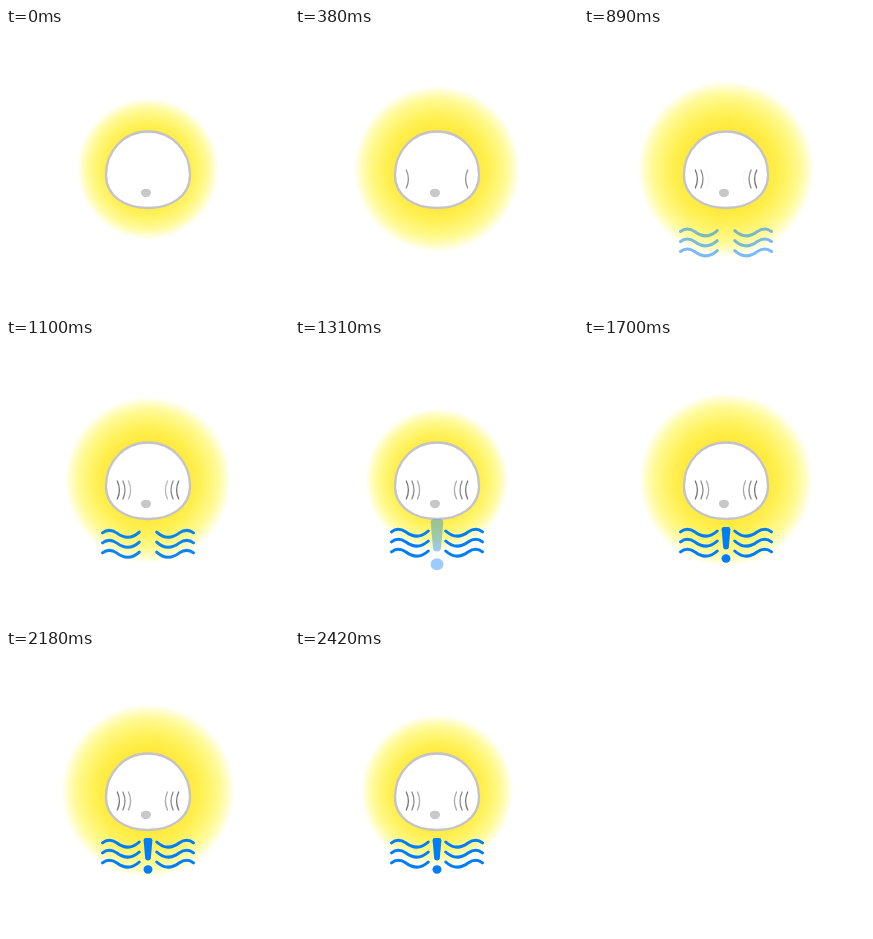
These frames come from a looping animation (283 by 283 pixels, 2.65 s). An HTML page:

```html
<!DOCTYPE html>
<html lang="en">
<head>
<meta charset="utf-8">
<title>Glowing head</title>
<style>
  html, body { margin: 0; width: 100%; height: 100%; overflow: hidden; background: #fff; }
  svg { display: block; width: 100vw; height: 100vh; }
</style>
</head>
<body>
<svg viewBox="0 0 283 283">
  <defs>
    <radialGradient id="sun">
      <stop offset=".46" stop-color="#ffe93c"/>
      <stop offset=".6" stop-color="#ffef50"/>
      <stop offset=".72" stop-color="#fff570"/>
      <stop offset=".84" stop-color="#fffa98"/>
      <stop offset=".92" stop-color="#fffdc8"/>
      <stop offset="1" stop-color="#fff"/>
    </radialGradient>
    <path id="wave" d="M96.5 192.8C101 189.2 106 189.6 111 193C118 198.3 126 198.6 133.3 192"/>
    <g id="waves">
      <use href="#wave"/>
      <use href="#wave" y="10"/>
      <use href="#wave" y="20"/>
    </g>
  </defs>
  <circle id="glow" cx="142" cy="141" fill="url(#sun)"/>
  <path d="M142 103.5C166 103.5 184 123 184 147C184 168 165 180 142 180C119 180 100 168 100 147C100 123 118 103.5 142 103.5Z"
        fill="#fff" stroke="#c3c3c8" stroke-width="2.3"/>
  <path d="M135 163.5C136 160 143 159.8 144.7 163C145.8 166.5 143 169.2 139.8 169.2C136.5 169 134.6 166.5 135 163.5Z" fill="#c8c8c8"/>
  <g id="lines" fill="none" stroke-width="1.3" stroke-linecap="round"></g>
  <g id="water" fill="none" stroke="#007dfa" stroke-width="3" stroke-linecap="round">
    <use href="#waves"/>
    <use href="#waves" transform="matrix(-1 0 0 1 284 0)"/>
  </g>
  <g id="mark" fill="#007dfa">
    <path d="M137.6 190.2Q137.6 188 140 188H144Q146.4 188 146.4 190.2L144.8 208.5Q144.5 210.5 142 210.5Q139.5 210.5 139.2 208.5Z"/>
    <ellipse cx="142" cy="219.5" rx="4.5" ry="4.2"/>
  </g>
</svg>
<script>
const LOOP = 2650, START = 140, STEP = 30, LAST = 76, PULSE = 1200, FADE = 500;
const $ = id => document.getElementById(id);

// Eased progress, cubic-bezier(.25, .1, .25, 1)
function ease(x) {
  if (x <= 0 || x >= 1) return x <= 0 ? 0 : 1;
  const curve = (s, a, b) => 3 * a * s * (1 - s) ** 2 + 3 * b * s * s * (1 - s) + s ** 3;
  let lo = 0, hi = 1;
  for (let i = 0; i < 20; i++) {
    const mid = (lo + hi) / 2;
    if (curve(mid, 0.25, 0.25) < x) lo = mid; else hi = mid;
  }
  return curve(lo, 0.1, 1);
}
const fade = (t, delay) => ease((t - delay) / FADE);

// Curved line pairs, outermost first
const pairs = ['#757575', '#8c8c8c', '#a9a9a9'].map((color, i) => {
  const x = 111.3 + 5.6 * i;
  const side = (x, bend) => `M${x} 142q${bend} 9 0 18`;
  const el = document.createElementNS('http://www.w3.org/2000/svg', 'path');
  el.setAttribute('d', side(x, 4.2) + side(284 - x, -4.2));
  el.setAttribute('stroke', color);
  $('lines').append(el);
  return el;
});

function draw(ms) {
  const n = Math.min(LAST, Math.max(0, Math.floor((ms - START) / STEP)));
  const t = n * STEP;

  // The glow grows and shrinks along the same eased path
  const u = 1 - Math.abs(1 - 2 * (t % PULSE) / PULSE);
  $('glow').setAttribute('r', 71 + 18 * ease(u));

  pairs.forEach((el, i) => el.setAttribute('opacity', fade(t, 350 * i)));

  const rise = fade(t, 600);
  $('water').setAttribute('opacity', rise);
  $('water').setAttribute('transform', `translate(0 ${22 * (1 - rise)})`);

  const pop = fade(t, 1050);
  $('mark').setAttribute('opacity', pop);
  $('mark').setAttribute('transform', `translate(142 206) scale(${1.7 - 0.7 * pop}) translate(-142 -206)`);
}

const begin = performance.now();
function tick() {
  draw((performance.now() - begin) % LOOP);
  requestAnimationFrame(tick);
}
tick();
</script>
</body>
</html>
```
